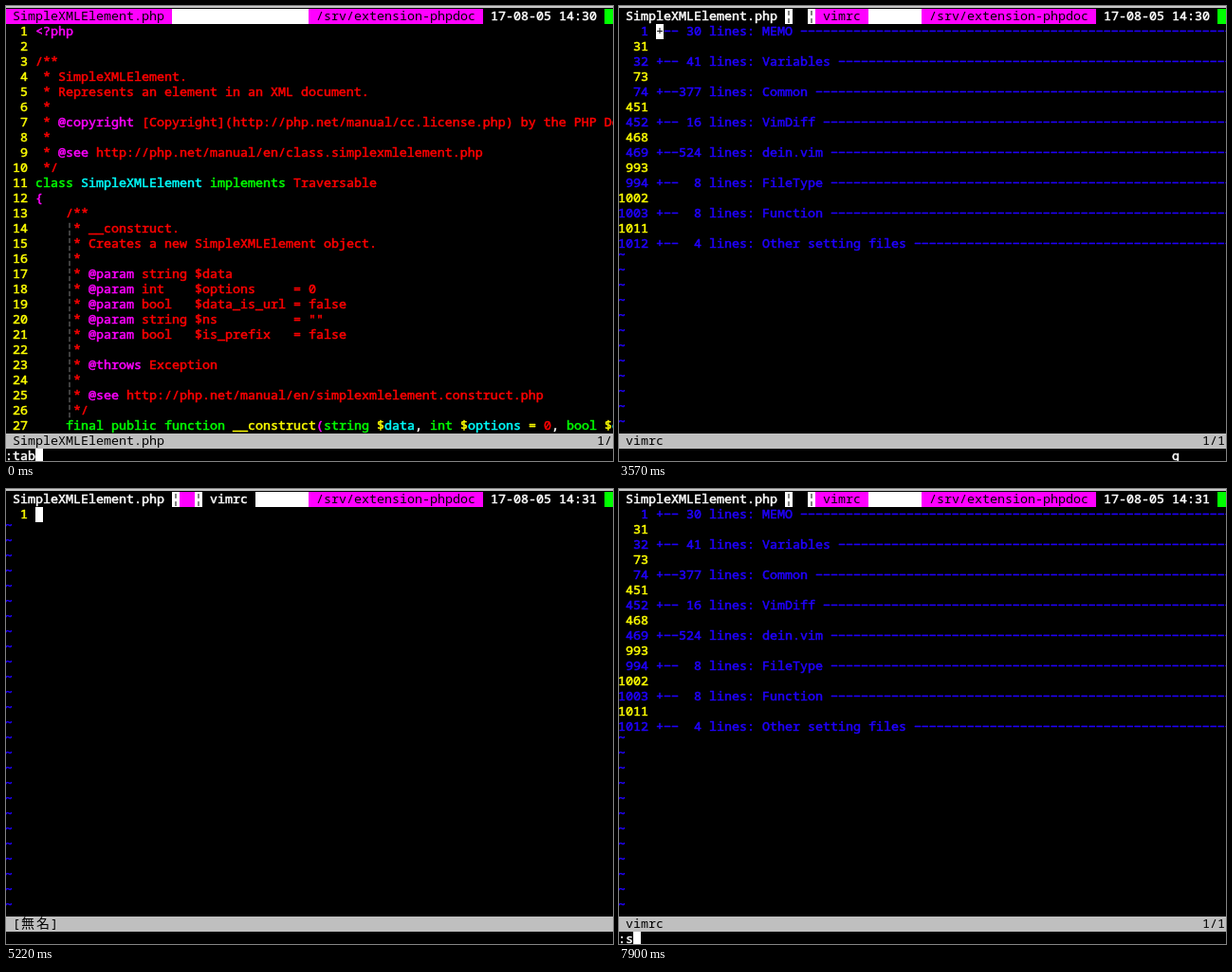
These frames come from a looping animation (640 by 480 pixels, 8 s). An HTML page with a canvas:

```html
<!DOCTYPE html>
<html lang="en">
<head>
<meta charset="utf-8">
<title>Vim tabs</title>
<style>
  html, body { margin: 0; width: 100%; height: 100%; overflow: hidden; background: #000; }
  canvas { display: block; }
</style>
</head>
<body>
<canvas id="screen" width="640" height="480"></canvas>
<script>
const ctx = document.getElementById('screen').getContext('2d');
const LOOP = 8000, CELL = 8, LINE = 16, BASELINE = 12, LAST_ROW = 29;
const MONO = '500 13.333px "Noto Sans Mono", "DejaVu Sans Mono", monospace';
const CJK = '14px "Noto Sans CJK JP", "Noto Sans CJK", sans-serif';
const MAGENTA = '#f0f', YELLOW = '#ff0', RED = '#f00', GREEN = '#0f0', CYAN = '#0ff',
      BLUE = '#2000ff', GREY = '#bfbfbf', GUIDE = '#555', WHITE = '#fff', BLACK = '#000';

const x = col => col * CELL - 1;
const y = row => row * LINE + 3;

function fill(row, col, endCol, color) {
  ctx.fillStyle = color;
  ctx.fillRect(x(col), y(row), (endCol - col) * CELL, LINE);
}

// Light text on black is smoothed a little heavier than black text.
function glyphs(text, left, baseline, color) {
  ctx.font = MONO;
  ctx.fillStyle = ctx.strokeStyle = color;
  ctx.lineWidth = 0.5;
  ctx.lineJoin = 'round';
  ctx.fillText(text, left, baseline);
  if (color !== BLACK) ctx.strokeText(text, left, baseline);
}

// Writes text on the cell grid and returns the column after it.
function put(row, col, text, color, back) {
  const end = col + text.length;
  if (back) fill(row, col, end, back);
  glyphs(text, x(col), y(row) + BASELINE, color);
  return end;
}

function runs(row, col, parts) {
  for (const [color, text] of parts) col = put(row, col, text, color);
}

function cursor(row, col, char = ' ') {
  put(row, col, char, BLACK, WHITE);
}

function tildes(fromRow) {
  for (let row = fromRow; row < 28; row++) glyphs('~', x(0), y(row) + 7.5, BLUE);
}

function status(text, position = '', col = 0) {
  fill(28, 0, 81, GREY);
  put(28, 1, text, BLACK);
  put(28, col, position, BLACK);
}

const docLines = `

/**
 * SimpleXMLElement.
 * Represents an element in an XML document.
 *
 * @copyright [Copyright](http://php.net/manual/cc.license.php) by the PHP Documentation
 *
 * @see http://php.net/manual/en/class.simplexmlelement.php
 */


    /**
    ¦* __construct.
    ¦* Creates a new SimpleXMLElement object.
    ¦*
    ¦* @param string $data
    ¦* @param int    $options     = 0
    ¦* @param bool   $data_is_url = false
    ¦* @param string $ns          = ""
    ¦* @param bool   $is_prefix   = false
    ¦*
    ¦* @throws Exception
    ¦*
    ¦* @see http://php.net/manual/en/simplexmlelement.construct.php
    ¦*/
`.split('\n');

const codeLines = {
  1: [[MAGENTA, '<?php']],
  11: [[GREEN, 'class '], [CYAN, 'SimpleXMLElement '], [GREEN, 'implements '], [RED, 'Traversable']],
  12: [[MAGENTA, '{']],
  27: [[GREEN, '    final public function '], [YELLOW, '__construct'], [MAGENTA, '('],
       [GREEN, 'string '], [YELLOW, '$'], [CYAN, 'data'], [WHITE, ', '],
       [GREEN, 'int '], [YELLOW, '$'], [CYAN, 'options '], [YELLOW, '= '], [RED, '0'], [WHITE, ', '],
       [GREEN, 'bool '], [YELLOW, '$'], [CYAN, 'data_is_url']],
};

const docColor = text => text[0] === '@' ? MAGENTA : text === '¦' ? GUIDE : RED;

function drawCode() {
  for (let n = 1; n <= 27; n++) {
    put(n, 0, String(n).padStart(3), YELLOW);
    runs(n, 4, codeLines[n] || docLines[n - 1].split(/(@\w+|¦)/).map(s => [docColor(s), s]));
  }
  status('SimpleXMLElement.php', '1/', 78);
}

function drawEmpty() {
  put(1, 0, '  1', YELLOW);
  tildes(2);
  status('[    ]');
  ctx.font = CJK;
  [...'無名'].forEach((char, i) => ctx.fillText(char, x(2 + 2 * i) + 1, y(28) + BASELINE));
}

const folds = [[1, 30, 'MEMO'], [32, 41, 'Variables'], [74, 377, 'Common'], [452, 16, 'VimDiff'],
  [469, 524, 'dein.vim'], [994, 8, 'FileType'], [1003, 8, 'Function'], [1012, 4, 'Other setting files']];

// The minus sign has the long dash of the fold lines.
function drawVimrc() {
  folds.forEach(([start, count, title], i) => {
    const row = 1 + i * 2;
    const label = `${String(start).padStart(4)} +−−${String(count).padStart(3)} lines: ${title} `;
    put(row, 0, label.padEnd(82, '−'), BLUE);
    if (i) put(row - 1, 0, String(start - 1).padStart(4), YELLOW);
  });
  tildes(16);
  status('vimrc', '1/1', 77);
}

const tabs = [
  { label: ' SimpleXMLElement.php ', draw: drawCode, home: [1, 4, '<'] },
  { label: '  ', draw: drawEmpty, home: [1, 4] },
  { label: ' vimrc ', draw: drawVimrc, home: [1, 5, '+'] },
];

function drawTabLine(active, count, clock) {
  let col = 0;
  fill(0, 0, 40, WHITE);
  tabs.slice(0, count).forEach(({ label }, i) => {
    if (i) col = put(0, col, '¦', BLACK);
    const on = i === active;
    col = put(0, col, label, on ? BLACK : WHITE, on ? MAGENTA : BLACK);
  });
  put(0, 40, ' /srv/extension-phpdoc ', BLACK, MAGENTA);
  put(0, 64, '17-08-05 ' + clock, WHITE);
  fill(0, 79, 81, GREEN);
}

// [start ms, active tab (-1: cleared), tab count, where the cursor is, typed text]
const steps = [
  [0, 0, 1, 'command', ':tab'],
  [150, 0, 1, 'command', ':tabn'],
  [590, 0, 1, 'command', ':tabnew'],
  [1040, 0, 1, 'hidden'],
  [1190, 1, 2, 'body'],
  [1940, 1, 2, 'hidden'],
  [2090, 1, 2, 'body'],
  [2240, 1, 2, 'body', ','],
  [2380, 1, 2, 'body', '$MYVIMRC^M'],
  [2530, 2, 3, 'body'],
  [3280, 2, 3, 'hidden'],
  [3430, 2, 3, 'body'],
  [3570, 2, 3, 'body', 'g'],
  [3720, -1, 3, 'hidden'],
  [3870, 1, 3, 'body'],
  [4470, 0, 3, 'body'],
  [5220, 1, 3, 'body'],
  [5520, 1, 3, 'body', 'g'],
  [5670, 2, 3, 'body'],
  [6120, 1, 3, 'body'],
  [6570, 2, 3, 'body'],
  [7310, 2, 3, 'hidden'],
  [7610, 2, 3, 'body'],
  [7750, 2, 3, 'command', ':'],
  [7900, 2, 3, 'command', ':s'],
];

function render(time) {
  const [start, active, count, where, typed = ''] = steps.findLast(step => step[0] <= time);
  ctx.fillStyle = BLACK;
  ctx.fillRect(0, 0, 640, 480);
  ctx.fillStyle = '#c8c8c8';
  ctx.fillRect(0, 0, 640, 2);
  if (active < 0) return;

  drawTabLine(active, count, start < 3720 ? '14:30' : '14:31');
  tabs[active].draw();
  if (where === 'command') cursor(LAST_ROW, put(LAST_ROW, 0, typed, WHITE));
  else put(LAST_ROW, 73, typed, WHITE);
  if (where === 'body') cursor(...tabs[active].home);
}

const origin = performance.now();
function tick() {
  render((performance.now() - origin) % LOOP);
  requestAnimationFrame(tick);
}
tick();
</script>
</body>
</html>
```
